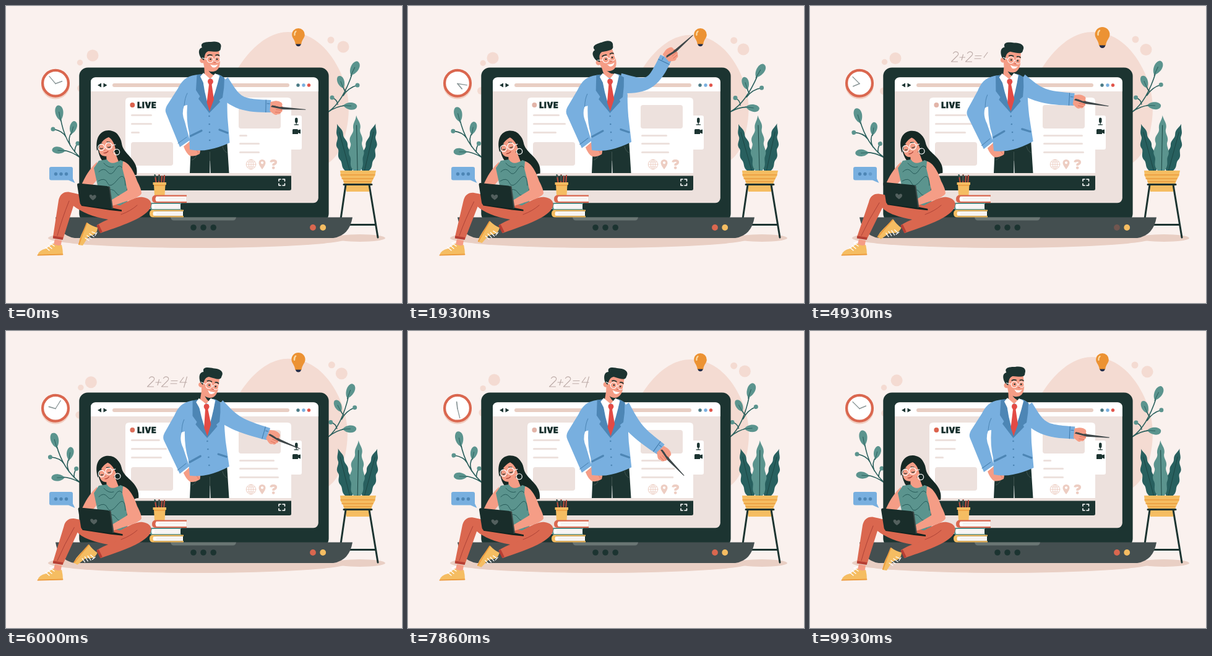
Recreate the animation shown at these times as an HTML page. Size 640 px wide and 480 px high, loop 10 s.

```html
<!DOCTYPE html>
<html lang="en">
<head>
<meta charset="utf-8">
<title>Online lesson</title>
<style>
html,body{margin:0;width:100%;height:100%;overflow:hidden;background:#faf1ee}
svg{display:block;width:100vw;height:100vh}
.ln{fill:none;stroke-linecap:round;stroke-linejoin:round}
.dark{fill:#1c3431}
.skin{fill:#f59d86}
.teal{fill:#5b948e}
.blue{fill:#78afdf}
.navy{fill:#4d86b5}
.red{fill:#da674f}
.yel{fill:#f5bd62}
.soft{fill:#ede1dd}
.peach{fill:#f4dbd2}
.stem{stroke:#2a5f5c;stroke-width:1.6}
</style>
</head>
<body>
<svg viewBox="0 0 640 480" xmlns="http://www.w3.org/2000/svg">
<defs>
  <g id="leaf">
    <path class="teal" d="M0 1C-8-4-9-20-2-23.500Q0-24 2-23C9-19 7-5 0 1Z"/>
    <path class="ln stem" d="M0 2L-.5-13" style="stroke-width:1"/>
  </g>
  <g id="blade">
    <path d="M-3 0C-13-10-6-15-9-22C-14-31-5-36-8-42C-11-51-2-54-3-61C-4-69 1-72 2-80C4-72 9-69 7-61C5-54 12-50 9-42C7-36 14-30 10-22C7-15 13-10 4 0Z"/>
    <path class="ln" d="M1 0L2-66" stroke="#1c4543" stroke-width=".9"/>
  </g>
</defs>

<path id="blob" class="peach" d="M352 150C371 92 412 42 456 42C500 42 526 76 540 106C555 139 557 168 550 201C542 236 531 250 510 260L360 250Z"/>
<g id="bubL"><circle class="peach" cx="140" cy="80" r="9.500"/><circle class="peach" cx="121" cy="133" r="6"/></g>
<circle id="bubL2" class="peach" cx="119.500" cy="91.500" r="4.700"/>
<circle id="bubR" class="peach" cx="545" cy="66" r="9.500"/>
<circle id="bubR2" class="peach" cx="525" cy="55" r="5.500"/>

<circle cx="80" cy="127.500" r="23" fill="#f1cdc0"/>
<circle cx="80" cy="124.800" r="20.900" fill="#fff" stroke="#da674f" stroke-width="4.200"/>
<g class="ln" stroke="#8d999a">
  <path id="hour" d="M80 125.500h11" stroke-width="1.800"/>
  <path id="minute" d="M80 125.500h15.500" stroke-width="1.300"/>
</g>

<g id="branchL">
  <path class="ln stem" d="M120 245C103 229 92 206 88 180M97 212Q92 202 77 199M104 226Q99 213 107 203M111 236Q111 228 116 222M120 245Q106 235 92 233"/>
  <use href="#leaf" transform="translate(88 184) rotate(-8)"/>
  <use href="#leaf" transform="translate(106 206) rotate(16) scale(.86)"/>
  <use href="#leaf" transform="translate(95 234) rotate(-84) scale(.87)"/>
  <circle class="teal" cx="76" cy="199" r="3.500"/><circle class="teal" cx="116" cy="222" r="3.500"/>
</g>
<g id="branchR">
  <path class="ln stem" d="M521 171C540 158 552 132 560 108M549 138Q546 136 545 130M545 145Q553 132 568 128M536 159Q535 151 527 148M521 171Q534 162 548 161"/>
  <use href="#leaf" transform="translate(558 111) rotate(28)"/>
  <use href="#leaf" transform="translate(545 132) rotate(-20) scale(.85)"/>
  <use href="#leaf" transform="translate(546 161) rotate(95) scale(.9)"/>
  <circle class="teal" cx="568" cy="128" r="3.500"/><circle class="teal" cx="527" cy="148" r="3.500"/>
</g>

<ellipse cx="311" cy="375" rx="243" ry="16" fill="#e9cfc4"/>
<ellipse cx="572" cy="375" rx="41" ry="6" fill="#e9cfc4"/>

<g fill="#28605f">
  <use id="leafA" href="#blade"/>
  <use id="leafC" href="#blade"/>
  <use id="leafB" href="#blade" class="teal"/>
</g>
<path class="yel" d="M540 266H598L596 275Q590 284 587 300H550Q547 283 541 275Z"/>
<path class="ln" d="M541 273H596M543 279H593M546 284H590" stroke="#ec9a3d" stroke-width="1.500"/>
<path class="ln" d="M546 288.500H591M549 289L541 344M587 289L601 374M555 353.500H596" stroke="#1c3431" stroke-width="3"/>

<rect class="dark" x="118.300" y="99.500" width="403.300" height="250" rx="14"/>
<rect class="soft" x="137" y="115.300" width="367.800" height="203" rx="8"/>
<path d="M137 138V123Q137 115.500 145 115.500H497Q504.800 115.500 504.800 123V138Z" fill="#fff"/>
<path class="dark" d="M154 124.500V131.500L148 128ZM157.500 124.500V131.500L163.500 128Z"/>
<rect x="172" y="125" width="286" height="6" rx="3" fill="#e9cec3"/>
<circle cx="472" cy="128" r="2.700" fill="#4a7a85"/><circle class="blue" cx="481" cy="128" r="2.700"/><circle cx="489.500" cy="128" r="2.700" fill="#e1554b"/>
<path d="M193 270V154Q193 148 199 148H455Q461 148 461 154V177H475Q478 177 478 180V229Q478 232 475 232H461V270Z" fill="#fff"/>
<path class="dark" d="M193 274.500H461V295.500Q461 298 458 298H193Z"/>
<path class="ln" d="M441 283V280H444M447 280H450.500V283M450.500 287V290H447M444 290H441V287" stroke="#fff" stroke-width="1.600"/>
<rect class="dark" x="467" y="180.500" width="4.500" height="8.500" rx="2.200"/>
<path class="ln" d="M469.200 188V191.500M466 191.800H472.500" stroke="#1c3431" stroke-width="1.200"/>
<path class="dark" d="M463 200.500Q463 199 464.500 199H470.500Q472 199 472 200.500L476 199.500V206.500L472 205V207H463Z"/>
<rect class="soft" x="376" y="160" width="68" height="38" rx="4"/>
<rect class="soft" x="202" y="220" width="68" height="38" rx="4"/>
<circle id="rec" cx="204.300" cy="160" r="3.900"/>
<text x="212.300" y="164.700" font-family="Inter,sans-serif" font-weight="900" font-size="12.500" letter-spacing=".7" fill="#132c2a" stroke="#132c2a" stroke-width=".5">LIVE</text>
<g id="lines" class="ln" stroke="#ede1dd" stroke-width="3"></g>
<g class="ln" stroke="#edcdc2" stroke-width=".9">
  <circle cx="396" cy="256" r="7.800"/><ellipse cx="396" cy="256" rx="3.600" ry="7.800"/>
  <path d="M396 248V264M388.500 256H403.500M390 252H402M390 260H402"/>
</g>
<path fill="#edcdc2" fill-rule="evenodd" d="M414 264Q408.500 257 408.500 253.500A5.500 5.500 0 0 1 419.500 253.500Q419.500 257 414 264ZM414 251.200A2.100 2.100 0 1 0 414.100 251.200Z"/>
<g id="ask"><path class="ln" d="M428.200 252.500Q428.500 249.800 432 249.800Q436.200 249.800 436.200 252.500Q436 255 432.300 256V258" stroke="#edcdc2" stroke-width="3.800" style="stroke-linecap:butt"/><circle cx="432.200" cy="261.500" r="2.300" fill="#edcdc2"/></g>

<path d="M80 341.500H560Q555 371 529 375H111Q85 371 80 341.500Z" fill="#444f50"/>
<path d="M266 341.500H372Q371 346.500 367 346.500H271Q267 346.500 266 341.500Z" fill="#6a7674"/>
<g class="dark"><circle cx="303" cy="358" r="4.800"/><circle cx="319" cy="358" r="4.800"/><circle cx="335.200" cy="358" r="4.800"/></g>
<circle id="lampR" class="red" cx="496" cy="358" r="4.900"/>
<circle id="lampY" class="yel" cx="512.200" cy="358" r="4.900"/>

<g id="bulb">
  <path d="M472.500 36A10.300 10.300 0 0 1 482.800 46.500C482.800 52 478 54 477.200 62H467.800C467 54 462.200 52 462.200 46.500A10.300 10.300 0 0 1 472.500 36Z" fill="#ec9233"/>
  <path class="ln" d="M466.500 47Q466 43 468.500 41" stroke="#fbdba6" stroke-width="2.200"/>
  <path d="M468.300 61.500H476.700Q476 65.300 472.500 65.300Q469 65.300 468.300 61.500Z" fill="#232c48"/>
</g>
<path id="rays" class="ln" d="M460.800 27.500L463.500 31.500M473 24.500V28.800M484 27.500L481.500 31.500" stroke="#ec9233" stroke-width="2"/>
<g id="sum" class="ln" stroke="#bbaaa6" stroke-width="1.100"></g>

<path class="dark" d="M299 226L297 270H329.200L329.600 250H330L330.600 270H360.500L357 215Z"/>
<path class="ln" d="M308 238Q308 247 300 249M350 227Q352 235 357 237M329.500 236V250" stroke="#50635f" stroke-width=".7"/>
<path id="sleeve" class="blue"/>
<g id="body">
  <path class="skin" d="M287 227L298 218Q308 221 314 234L313 239Q304 244 297 242Q291 238 287 227Z"/>
  <path class="ln" d="M303 229Q309 232 311 238" stroke="#d96f5b" stroke-width=".8"/>
  <path class="blue" d="M309 111C293 113 286 118 278 133L260 161Q256 168 259 174L281 228L297 217L289 187Q283 173 288 161L293 160Q291 185 296 205L297 232Q314 235 328 232Q344 229 361.500 221L358 180Q357 155 358 145L354 118Q349 112 341 110Z"/>
  <path class="ln" d="M288 161Q289 148 293 141M278 222L292 212" stroke="#4d86b5" stroke-width="1"/>
  <path class="navy" d="M308.500 111L318 110Q318 135 328.500 166L346 112L353 116Q353 132 350 148L344.500 152L346 155L328.500 173L311 150L313.500 146L307 136Z"/>
  <path d="M317.500 112Q320 140 328.500 165Q339 140 345 113L338 112L334 119L327 119L319 110Z" fill="#fff"/>
  <path d="M326.500 118H334L335 123L332.500 127L336 151L329 170L324.500 156L328 127L326 123Z" fill="#e34b45"/>
  <path class="ln" d="M298.500 210L316 201.500M345 200L358 205" stroke="#4d86b5" stroke-width="3.200"/>
  <g class="navy"><circle cx="328.500" cy="178" r="1.300"/><circle cx="328.700" cy="191" r="1.300"/><circle cx="329" cy="204" r="1.300"/><circle cx="329.200" cy="217" r="1.300"/></g>
  <g id="head">
    <path class="skin" d="M320 92L321 112L330 118L338 111V103Z"/>
    <path class="dark" d="M325 101Q333 107 342 104L339 112Q332 113 325 101Z"/>
    <path class="skin" d="M317 76L319 92C320 102 328 107 335 106C343 105 346 98 346 88L344 70L324 69Z"/>
    <circle class="skin" cx="317.500" cy="88" r="4.300"/>
    <path class="dark" d="M315 84C311 77 310 69 317 67C312 58 326 58 331 58C342 56 350 60 347 68C347 75 340 74 327 73Q322 75 321 81L320 88Z"/>
    <path class="ln" d="M326 80Q329 78 333 79.500M339 79.500Q342 78 344.500 80" stroke="#1c3431" stroke-width="1.700"/>
    <circle cx="330.500" cy="86" r="1.300" class="dark"/><circle cx="341" cy="86" r="1.300" class="dark"/>
    <path class="ln" d="M336.500 84L339 91.500H336" stroke="#cf5d4c" stroke-width=".9"/>
    <g class="ln" stroke="#fff"><circle cx="330" cy="86.500" r="5"/><circle cx="341.500" cy="86.500" r="4.400"/><path d="M335 86H337M325 86L317 84"/></g>
    <path d="M330 94.500Q337 97 342.500 94.500Q339 101 333.500 99Z" fill="#fff"/>
  </g>
  <path d="M319 108L314 114L320 126L329 117ZM338 109L344 112L341 124L331 117Z" fill="#fff"/>
</g>
<path id="cuff" class="ln" d="M-8-9.800V9.800M-6-4H-2" stroke="#3f78a8" stroke-width="1"/>
<g id="hand">
  <path class="skin" d="M-1-7L6-9Q12-10 17-7Q19-5 18-2Q21 0 19 4Q20 7 17 9Q16 13 12 12Q9 15 5 12L-1 8Z"/>
  <path d="M0 1L2-1.500L20 0L57 1L56 2L20 4Z" fill="#3f4749"/>
  <path class="skin" d="M5-6Q13-7 17-2Q17 1 13 0L8-1Z"/>
  <path class="ln" d="M9 5H18M8 9H16" stroke="#d96f5b" stroke-width=".9"/>
</g>

<g>
  <path class="ln" d="M243 288L241 274M247 288L247.500 273M251 288L252 275M255 288L256 274" stroke="#b64a3c" stroke-width="2.200"/>
  <path class="ln" d="M247.500 282V274M241 276L240.500 273" stroke="#24534f" stroke-width="2"/>
  <path class="yel" d="M237.500 285H259V289H257.500L256.500 306H240L239 289H237.500Z"/>
  <path d="M239 289H257.500V290.500H239Z" fill="#ec9a3d"/>
  <rect x="239" y="308" width="52" height="8" fill="#fff"/><path class="red" d="M292 305.500H242Q236 306 236 312Q236 318 242 318H292V316H243Q240 312 243 307.800H292Z"/>
  <rect x="232" y="320" width="50" height="8" fill="#fff"/><path class="teal" d="M283 318H235Q228 324 235 330H283V328H236Q234 324 236 320H283Z"/>
  <rect x="234" y="332" width="52" height="7" fill="#fff"/><path class="yel" d="M287 329.500H237Q232 330 232 335.500Q232 341 237 341.500H287V339.300H239Q236 335.500 239 331.700H287Z"/>
  <path class="ln" d="M247 311H289M247 314H289M240 323H280M240 326H280M243 334.500H284M243 337H284" stroke="#e2d8d4" stroke-width=".8"/>
</g>

<g id="backHair"><path d="M148 226C152 198 184 198 187 222C189 238 207 244 211 262Q212 268 211 273Q204 272 200 279L186 262L163 256Q150 250 148 226Z" fill="#162824"/></g>
<path class="skin" d="M147 252C136 262 128 275 122 289L136 294L152 275Z"/>
<path class="skin" d="M162 238L163 257Q172 264 183 254L176 236Z"/>
<path class="teal" d="M150 250L163 248Q170 259 185 249L192 252Q200 275 195 292L197 327H147L148 290L142 262Z"/>
<path class="ln" d="M150 268Q158 260 164 268T177 264T191 266M149 283Q160 276 164 286T180 281T193 290M160 300Q172 292 178 302T195 300M172 316Q180 308 188 318M158 254Q166 263 174 260" stroke="#285c5a" stroke-width="1"/>
<path id="legL" class="red"/>
<path class="red" d="M165 331C185 325 205 307 221 309C236 311 238 322 230 331C215 347 180 357 153 367L147 354C160 346 175 341 188 337Z"/>
<path class="ln" d="M148 354L154 366" stroke="#b63f34" stroke-width="4" style="stroke-linecap:butt"/>
<path class="ln" d="M186 337Q202 331 212 322" stroke="#a93f35" stroke-width=".9"/>
<path id="seam" class="ln" stroke="#a93f35" stroke-width=".9"/>
<path class="skin" d="M189 251C199 253 207 268 212 283Q219 296 219 303Q215 310 193 316L172 323L168 315L196 298Q193 280 188 262Z"/>
<path class="skin" d="M79 377L90 379L88 391L76 389Z"/>
<path class="ln" d="M76 373.500L92 376" stroke="#b63f34" stroke-width="4" style="stroke-linecap:butt"/>
<path class="yel" d="M51 403Q52 395 65 392L76 384Q83 389 90 386Q92 394 92 402Z"/>
<path class="ln" d="M51.500 402.700L91.500 401.500" stroke="#ec9a3d" stroke-width="1.800"/>
<path class="ln" d="M64 390L70 395M68 387L74 392M72 384L78 388M71 383L77 381" stroke="#fff" stroke-width="1.400"/>
<g id="shoe">
  <path class="yel" d="M131 350Q139 356 148 358Q148 365 143 369L133 373L124 387L117 386Q118 377 122 369Z"/>
  <path class="ln" d="M130.500 351Q124 367 118 385" stroke="#ec9a3d" stroke-width="1.800"/>
  <path class="ln" d="M128 375L134 379M131 371L138 376M135 368L142 373M139 365L146 368M144 371L147 366" stroke="#fff" stroke-width="1.300"/>
</g>
<g id="laptop">
  <path d="M121 320L170 326L187 329.500V332L168 330L122 323Z" fill="#12231f"/>
  <path d="M165 291L168 292L173 327L170 328Z" fill="#3d4b49"/>
  <path d="M117 286.500L163 291Q166 291.500 166.500 294L171 328L123 322Q120 321.500 119.500 318L115 289Q115 286.500 117 286.500Z" fill="#192d2a"/>
  <path d="M140.500 314Q133 309 135 305.500Q138 303.500 140 307Q143 304 145.500 306.500Q147 310 140.500 314Z" fill="#53605e"/>
</g>
<g id="girlHead">
  <path class="skin" d="M150 219Q152 208 166 207Q179 212 179 229Q173 239 161 243Q151 243 150 232Z"/>
  <path d="M147 234C144 213 152 201 166 201C182 202 187 214 187 234L177 231C175 221 171 215 166 212C158 215 151 223 150 229Z" fill="#162824"/>
  <path class="ln" d="M151 223L155 221.500M163 219.500L168 220M152.500 230Q154 231.500 156 230M164.500 228Q166.500 229.500 168.500 227.500" stroke="#1c3431" stroke-width="1.200"/>
  <path class="ln" d="M159 227L157.500 233H160" stroke="#cf5d4c" stroke-width=".9"/>
  <path class="ln" d="M158 237.500Q162 238 165 235" stroke="#a93f35" stroke-width="1.200"/>
  <g class="ln" stroke="#fff" stroke-width="1.200"><circle cx="154" cy="228.500" r="5.200"/><circle cx="166" cy="226.300" r="5.400"/><path d="M171.500 225L177 224"/><circle cx="179" cy="236" r="4.600"/></g>
</g>
<path class="blue" d="M73 260H105Q108 260 108 263V279L111.500 286L101 281.500H73Q70 281.500 70 278.500V263Q70 260 73 260Z"/>
<g class="navy"><circle id="dot0" cx="80.500" cy="271.500" r="2.700"/><circle id="dot1" cx="89" cy="271.500" r="2.700"/><circle id="dot2" cx="97.500" cy="271.500" r="2.700"/></g>
</svg>
<script>
const LOOP = 10000, KEYS = [0, 1930, 3290, 4930, 7000, 8790];
const $ = id => document.getElementById(id);
const set = (id, attr, v) => $(id).setAttribute(attr, v);
const clamp = x => Math.max(0, Math.min(1, x));
const smooth = x => { x = clamp(x); return x * x * (3 - 2 * x); };
const bump = (t, c, w) => smooth(1 - Math.abs(t - c) / w);

// Periodic monotone cubic through one value per key time
function track(...v) {
  const n = v.length;
  const h = KEYS.map((k, i) => (KEYS[i + 1] ?? LOOP) - k);
  const d = v.map((a, i) => (v[(i + 1) % n] - a) / h[i]);
  const m = d.map((b, i) => {
    const a = d[(i + n - 1) % n];
    return a * b > 0 ? 2 * a * b / (a + b) : 0;
  });
  return t => {
    let i = n - 1;
    while (KEYS[i] > t) i--;
    const j = (i + 1) % n, u = (t - KEYS[i]) / h[i], w = 1 - u;
    return v[i] * (1 + 2 * u) * w * w + m[i] * h[i] * u * w * w
      + v[j] * u * u * (3 - 2 * u) - m[j] * h[i] * u * u * w;
  };
}

const move = {
  blob: track(1, .966, .968, 1, .962, .985),
  bx: track(0, -3, -1, -2, -3, 2), by: track(0, 4, 3, 4.5, .5, -2),
  sx: track(0, 1.7, 2.5, 1, 1.7, 1.6), sy: track(0, .7, .3, -1, .8, 1.3),
  left: track(0, -4, -6, -6.8, -4.5, -.7),
  right: track(0, 5, 4, -1, -8, -5),
  leafA: track(0, -.7, -1.3, 0, 2, 1.5),
  leafB: track(0, -.5, 0, 2.3, 2.3, .6),
  leafC: track(0, -.7, .8, 2, 2, 1.3),
  body: track(0, -2, -3.6, -4, -2.2, -.5),
  head: track(0, -15, -8, 8, 14, 10),
  elbowX: track(374, 393, 391, 374, 370, 368), elbowY: track(161, 133, 133, 148, 155, 169),
  wristX: track(428, 417, 414, 427, 419, 400), wristY: track(162, 83, 86, 151, 178, 200),
  point: track(4, -41, -43, 9.5, 34, 56),
  bulb: track(1, 1, 1.16, 1.16, 1, 1),
  girl: track(0, -6, -7, -8, -7, -.7),
  knee: track(0, 4.5, 8.5, 10, 5.5, .5),
  shoe: track(0, 9, 16, 21, 16, 6),
  lapX: track(0, -.5, 1, 3.3, 0, 0), lapY: track(0, -.5, -1, -1.8, -.5, 0)
};

const lines = [
  [202, 176, track(236, 245, 253, 253, 245, 246)],
  [202, 190, track(236, 255, 265, 263, 255, 228)],
  [202, 204, track(216, 240, 262, 252, 252, 228)],
  [377, 209, track(390, 419, 441, 441, 423, 405)],
  [377, 222, track(410, 423, 437, 441, 437, 423)],
  [377, 236, track(410, 422, 433, 443, 437, 419)]
];

const two = "q2.500-4 6.500-2q4 3-1 7l-8.500 8.500h10";
const strokes = [
  [2, "M231.500 76.500" + two], [1, "M242 83h8.500"], [1, "M247.500 78.500l-2.500 9"], [2, "M254.500 76.500" + two],
  [1, "M267 80.500h10"], [1, "M266 85h10"], [2, "M287 75l-6 8h11"], [1, "M292.500 74l-5 17"]
];

function addPath(parent, d) {
  const p = document.createElementNS("http://www.w3.org/2000/svg", "path");
  if (d) p.setAttribute("d", d);
  return $(parent).appendChild(p);
}
const lineEls = lines.map(() => addPath("lines"));
const sumEls = strokes.map(([, d]) => {
  const p = addPath("sum", d);
  p.setAttribute("pathLength", 1);
  return p;
});

const rot = (id, a, x, y) => set(id, "transform", `rotate(${a} ${x} ${y})`);
const shift = (id, x, y) => set(id, "transform", `translate(${x} ${y})`);
const grow = (id, k, x, y) => set(id, "transform", `translate(${x} ${y}) scale(${k}) translate(${-x} ${-y})`);

function spin([x, y], deg, cx, cy) {
  const a = deg * Math.PI / 180, c = Math.cos(a), s = Math.sin(a);
  return [cx + (x - cx) * c - (y - cy) * s, cy + (x - cx) * s + (y - cy) * c];
}

// Tapered sleeve from shoulder s past elbow e to wrist w
function arm(s, e, w) {
  const side = (p, q, r) => {
    const dx = q[0] - p[0], dy = q[1] - p[1], l = Math.hypot(dx, dy);
    return [-dy / l * r, dx / l * r];
  };
  const mix = p => [p[0] * .1 + e[0] * .9, p[1] * .1 + e[1] * .9];
  const off = (p, n, k) => `${p[0] + n[0] * k} ${p[1] + n[1] * k} `;
  const a = mix(s), b = mix(w);
  const n0 = side(s, e, 16), na = side(s, e, 12), nb = side(e, w, 11.5), n1 = side(e, w, 10);
  return "M" + off(s, n0, 1) + "C" + off(a, na, 1) + off(b, nb, 1) + off(w, n1, 1)
    + "L" + off(w, n1, -1) + "C" + off(b, nb, -1) + off(a, na, -1) + off(s, n0, -1) + "Z";
}

function draw(t) {
  const v = {};
  for (const k in move) v[k] = move[k](t);

  grow("blob", v.blob, 455, 180);
  shift("bubL", v.bx, v.by);
  shift("bubR", v.bx, v.by);
  shift("bubL2", v.sx, v.sy);
  shift("bubR2", v.sx, v.sy);
  rot("hour", -20 + t * .036, 80, 125.5);
  rot("minute", 230 + t * .072, 80, 125.5);

  rot("branchL", v.left, 120, 245);
  rot("branchR", v.right, 521, 171);
  set("leafA", "transform", `translate(555 268) rotate(${v.leafA - 16})`);
  set("leafB", "transform", `translate(567 268) rotate(${v.leafB - 2}) scale(1.12 1.14)`);
  set("leafC", "transform", `translate(580 268) rotate(${v.leafC + 14}) scale(-1 1)`);

  // Screen contents and lamps
  const blink = smooth(.5 + .8 * Math.cos(t / LOOP * 6 * Math.PI));
  set("rec", "fill", `rgb(${226 - 7 * blink},${180 - 82 * blink},${168 - 91 * blink})`);
  lines.forEach(([x, y, end], i) => lineEls[i].setAttribute("d", `M${x + 1.5} ${y + .5}H${end(t) - 1.5}`));
  set("lampY", "opacity", 1 - .6 * bump(t, 3290, 700));
  set("lampR", "opacity", 1 - .7 * bump(t, 4930, 700));
  [4900, 4050, 3200].forEach((c, i) => set("dot" + i, "opacity", 1 - .5 * bump(t, 8100 - c, 800)));
  shift("ask", 0, -1.5 * bump(t, 8790, 500));
  grow("bulb", v.bulb, 472.5, 49);
  set("rays", "opacity", smooth((t - 2400) / 350) * smooth((4150 - t) / 350));

  let ink = (t - 3040) / 210;
  strokes.forEach(([len], i) => {
    const p = clamp(ink / len);
    sumEls[i].setAttribute("stroke-dasharray", `${p} 2`);
    sumEls[i].setAttribute("opacity", p > 0 ? 1 : 0);
    ink -= len;
  });
  set("sum", "opacity", 1 - smooth((t - 9000) / 500));

  // Teacher
  rot("body", v.body, 328, 232);
  rot("head", v.head - v.body, 327, 110);
  const s = spin([346, 125], v.body, 328, 232), e = [v.elbowX, v.elbowY], w = [v.wristX, v.wristY];
  set("sleeve", "d", arm(s, e, w));
  const fore = Math.atan2(w[1] - e[1], w[0] - e[0]) * 180 / Math.PI;
  set("cuff", "transform", `translate(${w}) rotate(${fore})`);
  set("hand", "transform", `translate(${w}) rotate(${v.point})`);

  // Student
  rot("backHair", v.girl * .5, 170, 225);
  rot("girlHead", v.girl, 170, 225);
  rot("shoe", v.shoe, 147, 357);
  shift("laptop", v.lapX, v.lapY);
  const k = v.knee, ky = k * .3;
  set("legL", "d", `M76 373L${85 + k} ${314 + ky}Q${88 + k} ${300 + ky} ${101 + k} ${300.5 + ky}`
    + `C125 305 160 316 193 325L188 347L165 345C140 341 122 333 ${109 + k * .8} ${323 + ky}L92 377Z`);
  set("seam", "d", `M83 371Q${90 + k * .5} 345 ${102 + k} ${315 + ky}`);
}

function tick(now) {
  draw(now % LOOP);
  requestAnimationFrame(tick);
}
draw(0);
requestAnimationFrame(tick);
</script>
</body>
</html>
```
